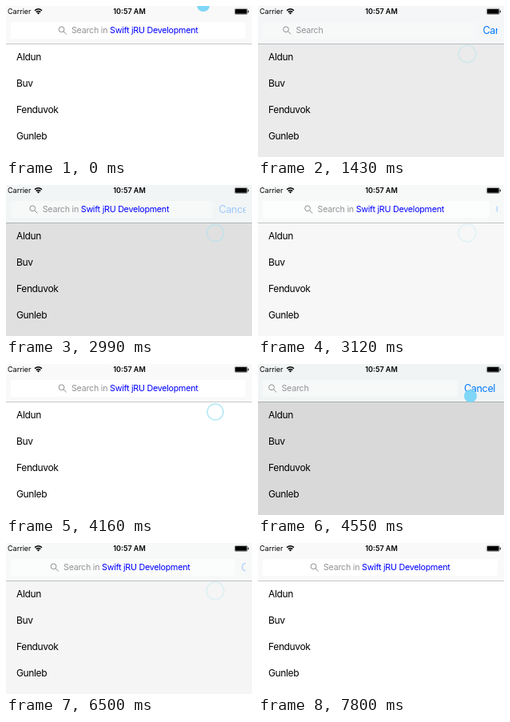
These frames come from a looping animation (308x189 px, 8450 ms). An HTML page:

```html
<!DOCTYPE html>
<html lang="en">
<head>
<meta charset="utf-8">
<title>Search bar</title>
<style>
  html, body { margin: 0; height: 100%; overflow: hidden; background: #fff; }
  svg { display: block; width: 100vw; height: 100vh; font-family: Inter, Roboto, sans-serif; }
  .status { font-size: 9px; }
  .row { font-size: 12px; letter-spacing: -.03em; }
  .hint { font-size: 10.65px; letter-spacing: -.02em; fill: #929296; white-space: pre; }
  .cancel { font-size: 12.6px; letter-spacing: -.03em; fill: #007aff; }
</style>
</head>
<body>
<svg viewBox="0 0 308 189">
  <clipPath id="edge"><rect width="300" height="48"/></clipPath>
  <rect id="list" width="308" height="189"/>
  <g class="row">
    <text x="13" y="68">Aldun</text>
    <text x="13" y="101">Buv</text>
    <text x="13" y="134">Fenduvok</text>
    <text x="13" y="167">Gunleb</text>
  </g>

  <rect id="bar" width="308" height="47"/>
  <rect id="line" y="47" width="308" height="1"/>
  <g class="status">
    <text x="2" y="10">Carrier</text>
    <text x="154.5" y="10" text-anchor="middle" font-weight="600">10:57 AM</text>
  </g>
  <g fill="none" stroke="#000" stroke-width="1.4">
    <path d="M36 5.6Q40.5 1.8 45 5.6M37.7 7.6Q40.5 5.2 43.3 7.6"/>
    <circle cx="40.5" cy="9" r=".5"/>
  </g>
  <rect x="286.3" y="3.3" width="16" height="7.2" rx="1.5" fill="none" stroke="#000" stroke-width=".6" stroke-opacity=".6"/>
  <rect x="287" y="4" width="14.6" height="5.8" rx=".8"/>
  <rect x="302.8" y="5.6" width="1" height="2.6" rx=".5"/>

  <rect id="field" x="6" y="20" height="21" rx="3"/>
  <g id="icon" fill="none" stroke="#8e8e93" stroke-width="1">
    <circle cx="4" cy="29.3" r="3.4"/>
    <path d="M6.5 31.8 10.2 35.4"/>
  </g>
  <text id="hint" class="hint" y="34">Search<tspan id="scope"> in <tspan fill="#00f">Swift jRU Development</tspan></tspan></text>
  <rect id="caret" x="29" y="23" width="1" height="14" fill="#4a6fe3"/>
  <g clip-path="url(#edge)"><text id="cancel" class="cancel" y="34.6">Cancel</text></g>

  <circle id="ring" cx="262" cy="60" fill="none" stroke="#a5e4f2" stroke-width="1.5"/>
  <circle id="dot" r="8" fill="#76d3f5" fill-opacity=".93"/>
</svg>
<script>
const LOOP = 8450, STEP = 130, SLIDE = 330;
// Each tap slides the search bar open or closed.
const taps = [
  { press: 1170, start: 1230, open: true },
  { press: 2730, start: 2868, open: false },
  { press: 4160, start: 4220, open: true },
  { press: 6240, start: 6262, open: false },
];

const el = Object.fromEntries([...document.querySelectorAll('[id]')].map(e => [e.id, e]));
const set = (id, attrs) => {
  for (const key in attrs) el[id].setAttribute(key, attrs[key]);
};
const clamp = x => Math.min(1, Math.max(0, x));
const smooth = x => x * x * (3 - 2 * x);
const mix = (a, b, k) => a + (b - a) * k;
const shade = (from, to, k) =>
  `rgb(${from.map((c, i) => Math.round(mix(c, to[i], k)))})`;
const bezier = (a, b, c, s) =>
  (1 - s) ** 2 * a + 2 * s * (1 - s) * b + s * s * c;

function drawBar(t, tap) {
  const since = tap ? t - tap.start : 0;
  const progress = k => !tap ? 0 : tap.open ? k : 1 - k;
  const moved = smooth(clamp(since / SLIDE));
  // The text leads; the field, button and dimming lag behind it.
  const slide = progress(moved);
  const open = progress(moved ** 1.5);
  const typing = tap && (tap.open ? since >= 0 : since < -STEP / 2);

  set('list', { fill: shade([255, 255, 255], [217, 217, 217], open) });
  set('bar', { fill: shade([249, 249, 249], [241, 244, 245], open) });
  set('line', { fill: shade([200, 200, 200], [170, 174, 176], open) });
  set('field', {
    width: 294 - 50 * open,
    fill: shade([255, 255, 255], [247, 249, 249], clamp(open * 2)),
  });
  set('icon', { transform: `translate(${mix(65.5, 13, slide)})` });
  set('hint', { x: mix(82, 29.5, slide) });
  set('scope', { display: typing ? 'none' : 'inline' });
  set('cancel', { x: mix(308, 258, open), opacity: tap && !tap.open ? .35 : 1 });

  const blink = since - 460;
  const shown = tap && tap.open && blink >= 0;
  set('caret', { opacity: shown ? clamp(Math.abs(blink - 780) / 260 - .5) : 0 });
}

function drawTouch(t, tap) {
  const age = tap ? (t - tap.start + 60) / 320 : -1;
  const ringing = age >= 0 && age < 1.1;
  set('ring', { r: 10 + clamp(age), opacity: ringing ? .85 - .6 * age : 0 });

  const s = clamp(t / 910);
  set('dot', {
    cx: bezier(247, 323, 266, s) + 8 * clamp((t - 7020) / 260),
    cy: bezier(-1, 144, 40, s),
    opacity: ringing || t >= 7800 ? 0 : 1,
  });
}

function draw(now) {
  const t = Math.floor(now % LOOP / STEP) * STEP;
  const tap = taps.findLast(p => t >= p.press);
  drawBar(t, tap);
  drawTouch(t, tap);
  requestAnimationFrame(draw);
}
draw(performance.now());
</script>
</body>
</html>
```
